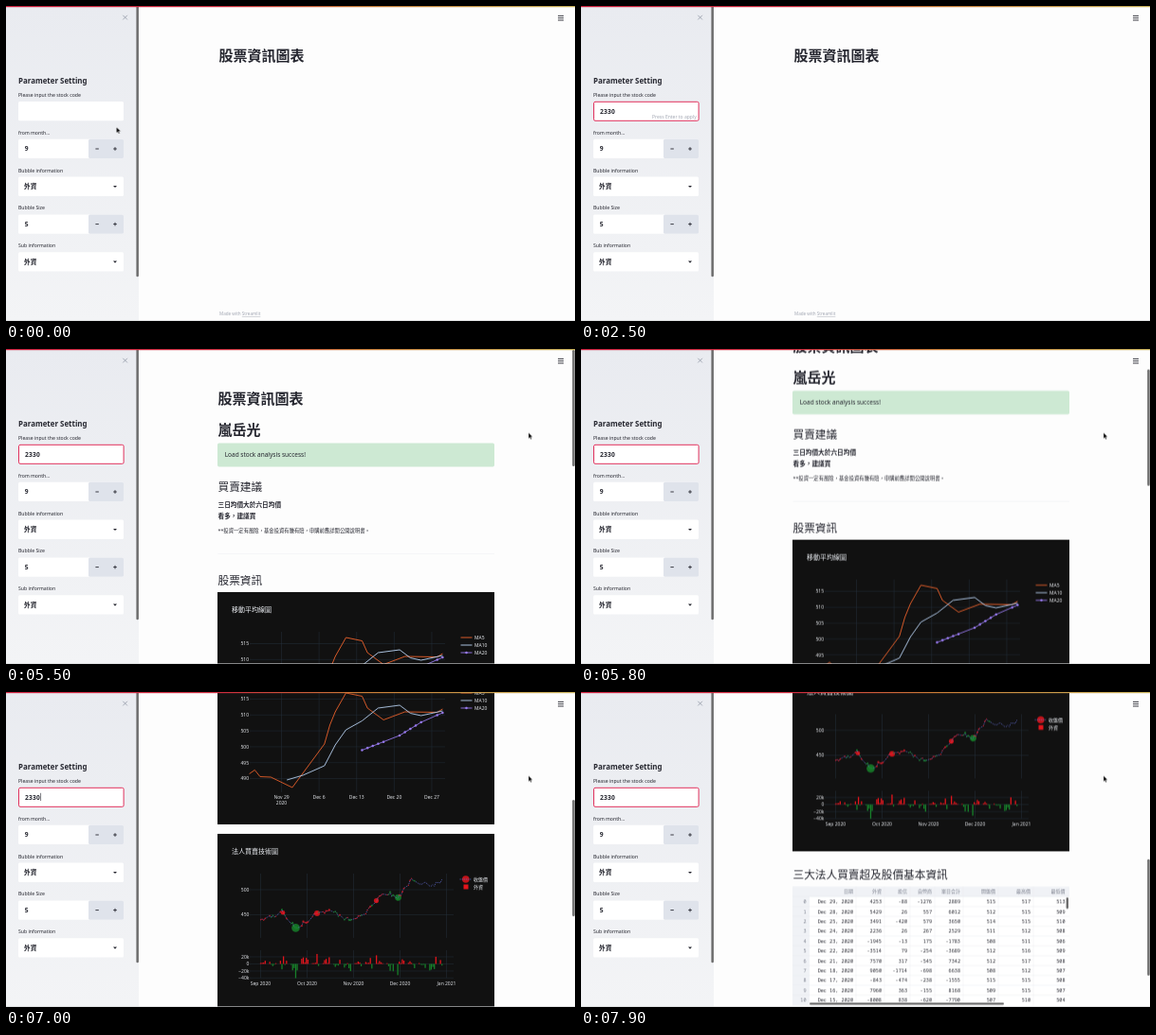
Recreate the animation shown at these times as an HTML page. Size 600 by 333 pixels, loop 8000 ms.

```html
<!DOCTYPE html>
<html>
<head>
<meta charset="utf-8">
<title>Stock dashboard</title>
<style>
html, body { margin: 0; width: 100%; height: 100%; overflow: hidden; background: #fdfdfd; }
svg { display: block; width: 100vw; height: 100vh; }
text { font-family: "Noto Sans", "Noto Sans CJK TC", "Noto Sans CJK JP", "Noto Sans CJK", sans-serif; font-weight: 500; fill: #262730; white-space: pre; }
.bold { font-weight: 700; }
.semi { font-weight: 600; }
.mid { text-anchor: middle; }
.end { text-anchor: end; }
.soft { fill: #a3a8b4; font-weight: 400; }
.plot text { font-family: "Open Sans", "Noto Sans CJK TC", "Noto Sans CJK JP", "Noto Sans CJK", sans-serif; fill: #f2f5fa; }
.grid { stroke: #283442; stroke-width: .45; fill: none; }
.table text { font-family: "Noto Sans Mono", "Noto Sans CJK TC", "Noto Sans CJK JP", "Noto Sans CJK", monospace; }
.table .dim { fill: #7c808e; }
</style>
</head>
<body>
<svg id="stage" viewBox="0 0 600 333" preserveAspectRatio="none"></svg>
<script>
const LOOP = 8000;
const RED = '#e3151c', GREEN = '#17802a', INK = '#262730', BAR = '#6d6d6d';
let css = '';

// Markup helpers
const text = (x, y, size, str, cls = '') => `<text x="${x}" y="${y}" font-size="${size}" class="${cls}">${str}</text>`;
const rect = (x, y, w, h, fill, more = '') => `<rect x="${x}" y="${y}" width="${w}" height="${h}" fill="${fill}" ${more}/>`;
const path = (d, stroke, width, more = '') => `<path d="${d}" fill="none" stroke="${stroke}" stroke-width="${width}" ${more}/>`;
const dot = (x, y, r, fill, more = '') => `<circle cx="${x}" cy="${y}" r="${r}" fill="${fill}" ${more}/>`;
const group = (id, body) => `<g id="${id}">${body}</g>`;
const poly = pts => 'M' + pts.map(p => p.map(v => v.toFixed(1)).join(' ')).join('L');
const hline = (x1, x2, y) => `M${x1} ${y}H${x2}`;
const vline = (x, y1, y2) => `M${x} ${y1}V${y2}`;
const each = (list, fn) => list.map(fn).join('');
const span = (n, fn) => Array.from({ length: n }, (_, i) => fn(i));

// Value at x on the line through a few key points
function along(keys, x) {
  const i = Math.max(1, keys.findIndex(k => k[0] >= x));
  const [a, b] = [keys[i - 1], keys[i]];
  return a[1] + (b[1] - a[1]) * (x - a[0]) / (b[0] - a[0]);
}

let seed = 11;
const rand = () => (seed = seed * 16807 % 2147483647) / 2147483647;

// Keyframe helpers: times in ms, motion advances every 100 ms
const HOLD = true;
const used = {};
function track(id, prop, frames) {
  const all = frames[0][0] ? [[0, frames[0][1], HOLD], ...frames] : frames;
  const rules = all.map(([ms, value, hold], i) => {
    const next = all[i + 1];
    const ease = hold || !next ? 'step-end' : `steps(${(next[0] - ms) / 100})`;
    return `${ms / LOOP * 100}%{${prop}:${value};animation-timing-function:${ease}}`;
  });
  rules.push(`100%{${prop}:${all[all.length - 1][1]}}`);
  css += `@keyframes ${id}-${prop}{${rules.join('')}}`;
  (used[id] = used[id] || []).push(`${id}-${prop} ${LOOP}ms infinite`);
}
const move = (id, frames) =>
  track(id, 'transform', frames.map(([ms, x, y, hold]) => [ms, `translate(${x}px,${y}px)`, hold]));
// Toggles at each listed time, starting hidden
function show(id, ...times) {
  const frames = times.map((ms, i) => [ms, i % 2 ? 0 : 1, HOLD]);
  track(id, 'opacity', times[0] ? [[0, 0, HOLD], ...frames] : frames);
}

const panel = (y, title, body) =>
  `<g class="plot" transform="translate(0 ${y})">${rect(223, 0, 292, 187, '#111')}${text(238, 20.7, 7, title)}${body}</g>`;

function averages() {
  const x = day => 256.6 + 5.66 * (day + 2 * Math.floor(day / 5));
  const place = keys => keys.map(([day, y]) => [x(day), y]);
  const ma5 = place([[0, 133.5], [1, 129.5], [2, 136.5], [4, 137], [6, 148], [10, 102], [11, 82], [12, 68],
    [14, 48], [15, 51.5], [16, 64], [19, 76.5], [21, 68], [25, 68.5], [26, 65]]);
  const ma10 = place([[5, 140], [8, 135], [10, 125], [12, 103], [14, 87], [15, 77.5], [18, 64], [20, 61], [22, 69.5], [24, 72], [26, 67]]);
  const rise = place([[15, 108.5], [20, 93], [24, 79], [26, 69]]);
  const ma20 = span(12, i => [x(15 + i), along(rise, x(15 + i))]);
  const tickY = i => 54.5 + 16.8 * i;
  const weekX = i => 290.5 + 39.62 * i;
  const weeks = ['Nov 29', 'Dec 6', 'Dec 13', 'Dec 20', 'Dec 27'];
  const grid = span(6, i => hline(257, 463, tickY(i))).join('') + span(5, i => vline(weekX(i), 42, 153)).join('');
  const axes = `<path class="grid" d="${grid}"/>`
    + span(6, i => text(256, tickY(i) + 1.8, 5, 515 - 5 * i, 'end')).join('')
    + each(weeks, (w, i) => text(weekX(i), 160, 5, w, 'mid')) + text(weekX(0), 166.3, 5, 2020, 'mid');
  const lines = [['MA5', '#ee642d', ma5], ['MA10', '#bcd5f5', ma10], ['MA20', '#9a7cf2', ma20]];
  const traces = each(lines, ([name, color, pts], i) => path(poly(pts), color, .9)
    + path(hline(479.5, 491.5, 48 + 8 * i), color, .9) + text(494, 49.8 + 8 * i, 5, name))
    + each([...ma20, [485.5, 64]], p => dot(...p, 1.25, lines[2][1]));
  return panel(257, '移動平均線圖', group('axes', axes) + group('traces', traces));
}

function trades() {
  const keys = [[268, 93], [280, 87], [285, 88], [291, 82], [306, 100], [316, 93], [328, 84], [342, 80], [354, 88],
    [364, 92], [380, 83], [396, 64], [404, 63], [413, 68], [428, 48], [436, 52], [452, 54], [462, 49]];
  // Larger trades: place, size and side
  const big = [[292, 2.3, RED], [305.5, 4.3, GREEN], [328, 3, RED], [390.5, 2.6, RED], [413.5, 3.4, GREEN]];
  const line = [];
  let marks = '', bars = '';
  for (let day = 0; day < 120; day++) {
    if ((day + 2) % 7 > 5 || (day + 2) % 7 < 1) continue;
    const x = 268.5 + 1.607 * day;
    const y = along(keys, x) + (rand() - .5) * 4;
    const trade = big.find(b => Math.abs(b[0] - x) < .9);
    const up = along(keys, x + 1) < along(keys, x) !== rand() < .2;
    const fill = trade ? trade[2] : up ? RED : GREEN;
    const h = trade ? trade[1] * 3.5 : .8 + 7 * rand() ** 3;
    line.push([x, y]);
    if (x < 432) marks += dot(x, y, .6 + h * .08, fill, 'opacity=".75"');
    bars += rect(x - .65, fill === RED ? 137.5 - h : 137.5, 1.3, h, fill);
  }
  const bubbles = each(big, ([x, r, fill]) => dot(x, along(keys, x), r, fill, 'opacity=".85"'));
  const months = ['Sep 2020', 'Oct 2020', 'Nov 2020', 'Dec 2020', 'Jan 2021'];
  const monthX = i => 268.5 + 49 * i;
  const scale = [[500, 59], [450, 85.5], ['20k', 130], [0, 137.5], ['−20k', 145], ['−40k', 152.3]];
  const grid = each(scale, s => hline(257, 472, s[1])) + span(5, i => vline(monthX(i), 42, 110) + vline(monthX(i), 123, 152.3)).join('');
  const dashes = 'stroke-dasharray="1.2 .9"';
  return panel(454, '法人買賣技術圖', `<path class="grid" d="${grid}"/>`
    + each(scale, ([v, y]) => text(256.4, y + 1.8, 5, v, 'end'))
    + each(months, (m, i) => text(monthX(i), 159.6, 5, m, 'mid'))
    + bars + bubbles + path(poly(line), '#6672d8', .7, dashes) + marks
    + dot(484.8, 48, 3.8, RED, 'opacity=".85"') + path(hline(478.5, 491, 48), '#6672d8', .7, dashes)
    + text(493, 49.9, 5, '收盤價') + rect(482.5, 53.5, 5, 5, RED) + text(493, 57.9, 5, '外資'));
}

function table() {
  const right = [287, 317, 344, 370, 400, 437, 474, 510.5];
  const heads = '日期 外資 投信 自營商 單日合計 開盤價 最高價 最低價'.split(' ');
  const days = span(15, i => 29 - i).filter(d => d % 7 !== 5 && d % 7 !== 6);
  const rows = `4253 -88 -1276 515 517 513
    5429 26 557 512 515 509
    3491 -420 579 514 515 510
    2236 26 267 511 512 508
    -1945 -13 175 508 511 506
    -3514 79 -254 512 516 509
    7570 317 -545 512 517 508
    9050 -1714 -698 508 512 507
    -843 -474 -238 515 515 508
    7960 363 -155 509 515 507
    -8008 838 -620 507 510 504`.split('\n').map(r => r.trim().split(' '));
  const body = each(rows, (row, i) => {
    const y = 18 + 10.4 * i;
    const net = row.slice(0, 3);
    const sum = net.reduce((total, v) => total + +v, 0);
    const cells = [`Dec ${days[i]}, 2020`, ...net, sum, ...row.slice(3)];
    return text(237.5, y, 5.2, i, 'end dim') + each(cells, (v, j) => text(right[j], y, 5.2, v, 'end'));
  });
  const lines = each(rows, (_, i) => hline(223, 515, 10.7 + 10.4 * i)) + each(right.slice(0, -1), x => vline(x + 3, 0, 125.5));
  return `<g class="table" transform="translate(0 678.3)">${rect(223, 0, 292, 125.5, '#fff')}`
    + rect(223, 0, 292, 10.7, '#f0f2f6') + rect(223, 0, 18, 125.5, '#f0f2f6') + path(lines, '#e9ebf0', .4)
    + each(heads, (h, j) => text(right[j], 7.2, 5, h, 'end dim')) + body
    + rect(511.6, 11.5, 2.4, 12, BAR, 'rx="1.2"') + rect(241, 122.6, 205, 2.4, BAR, 'rx="1.2"') + '</g>';
}

function page() {
  const x = 223.5;
  return text(x, 57.6, 15, '股票資訊圖表', 'bold')
    + group('company', text(x, 90.8, 15, '嵐岳光', 'bold'))
    + group('alert', rect(223, 99.5, 292, 25, '#cde9d3', 'rx="1.7"') + text(230.7, 114.4, 6.5, 'Load stock analysis success!'))
    + group('advice', text(x, 150.4, 11.67, '買賣建議') + text(x, 167.4, 6.67, '三日均價大於六日均價', 'bold'))
    + group('report', text(x, 179, 6.67, '看多，建議買', 'bold')
      + text(x, 193.9, 5.33, '**投資一定有風險，基金投資有賺有賠，申購前應詳閱公開說明書。')
      + path(hline(x, 515, 216.5), '#eceef2', .5)
      + text(x, 249.3, 11.67, '股票資訊') + averages() + trades()
      + text(x, 670.4, 11.67, '三大法人買賣超及股價基本資訊') + table())
    + group('footer', text(x + .5, 327.2, 4.6, 'Made with <tspan text-decoration="underline">Streamlit</tspan>', 'soft'));
}

function sidebar() {
  const rowY = i => 101 + 39.8 * i;
  const box = y => rect(13, y, 111, 20.3, '#fff', 'rx="1.5"');
  const number = (y, v) => box(y) + rect(87, y, 37, 20.3, '#dfe3eb', 'rx="1.5"') + text(19.8, y + 12.6, 6.67, v, 'semi')
    + path(`${hline(94.4, 97.8, y + 10.2)}${hline(113.2, 116.8, y + 10.2)}${vline(115, y + 8.4, y + 12)}`, INK, .9);
  const select = y => box(y) + text(19, y + 12.6, 6.67, '外資', 'semi')
    + `<path d="M113 ${y + 9.4}h4l-2 2.1z" fill="${INK}"/>`;
  const labels = ['Please input the stock code', 'from month...', 'Bubble information', 'Bubble Size', 'Sub information'];
  return rect(0, 0, 140, 333, 'url(#side)') + path('M123.3 9.8l4.6 4.6m0-4.6l-4.6 4.6', '#a3a8b4', 1)
    + text(13, 82, 7.9, 'Parameter Setting', 'bold')
    + each(labels, (l, i) => text(13, rowY(i) - 5, 5.15, l))
    + box(rowY(0)) + number(rowY(1), 9) + select(rowY(2)) + number(rowY(3), 5) + select(rowY(4))
    + group('focus', rect(13.5, 101.3, 110.6, 20, 'none', 'rx="1.5" stroke="#e0305c" stroke-width="1"'))
    + each([...'2330'], (c, i) => group('key' + i, text(19.9 + 4.02 * i, 113.6, 6.67, c, 'semi')))
    + group('hint', text(121.7, 118.9, 5, 'Press Enter to apply', 'soft end'))
    + group('caret', group('caretPos', rect(0, 106.8, .6, 8.2, INK)))
    + rect(137.4, -2, 2.5, 288.3, BAR, 'rx="1.25"');
}

const status = group('status',
  path('M502 14.8q1.1-1 2.2 0t2.2 0 2.2 0 2.2 0M502 16.4h8.6M503 9.4l2.6 1.2 2.3 2.6M505.6 10.6l3.4-1.6', '#8b8f9b', .7)
  + dot(508.9, 11.7, .9, '#8b8f9b')
  + text(515, 14.4, 4.8, 'RUNNING...', 'soft')
  + rect(546.8, 6.6, 26.4, 11.3, '#fff', 'rx="1.7" stroke="#dfe2e8" stroke-width=".5"') + text(560, 14.1, 5.2, 'Stop', 'mid semi'));

const stops = (...list) => each(list, ([at, color]) => `<stop offset="${at}" stop-color="${color}"/>`);
document.getElementById('stage').innerHTML = `<defs>
  <linearGradient id="side" x2="0" y2="1">${stops([0, '#e9ebf0'], [1, '#f3f4f6'])}</linearGradient>
  <linearGradient id="bar">${stops([0, '#cc1f3d'], [.38, '#cd2c3d'], [.62, '#c67a35'], [1, '#c9b25a'])}</linearGradient>
</defs>`
  + rect(0, 0, 600, 333, '#fdfdfd') + group('page', page()) + sidebar() + status
  + path('M582 10.4h6M582 12.7h6M582 15h6', INK, .9)
  + group('thumb', group('thumbPos', rect(597.2, 1, 2.5, 123, BAR, 'rx="1.25"')))
  + rect(0, 0, 600, 1.2, 'url(#bar)') + rect(0, 332.4, 600, .6, '#d4d5d8')
  + group('beam', group('beamPos', path('M-1.4-3.4q1.4 0 1.4 1v4.8q0 1-1.4 1M1.4-3.4q-1.4 0-1.4 1v4.8q0 1 1.4 1', '#222', .6)))
  + group('arrow', group('arrowPos', '<path d="M0 0v6.2l1.4-1.3 1 2.2 1-.4-1-2.2h2z" fill="#000" stroke="#fff" stroke-width=".35"/>'));

// Typing
track('focus', 'opacity', [[0, 0, HOLD], [500, 0], [800, 1, HOLD]]);
const typed = [1300, 1600, 1800, 2000];
typed.forEach((ms, i) => show('key' + i, ms));
move('caretPos', [[0, 19.8, 0, HOLD], ...typed.map((ms, i) => [ms, 24 + 4.02 * i, 0, HOLD])]);
show('caret', 600, 1100, 1300, ...span(11, i => 2500 + 500 * i));
show('hint', 1300, 2900);

// Loading
track('status', 'opacity', [[0, 0, HOLD], [2800, 0], [3200, 1, HOLD], [4200, 0, HOLD]]);
show('company', 3400);
show('alert', 3600);
show('advice', 3800);
show('report', 4200);
show('axes', 4500);
show('traces', 5000);
show('footer', 0, 4200);
show('thumb', 4200);

// Scrolling: the thumb follows the page
const scroll = [[5500, 0], [6300, 147.8], [7500, 415.7], [7900, 472.6]];
move('page', [[0, 1, 0, HOLD], [4200, 0, 0, HOLD], ...scroll.map(([ms, y]) => [ms, 0, -y])]);
move('thumbPos', scroll.map(([ms, y]) => [ms, 0, y * .372]));

// Pointer
show('arrow', 0, 300, 3400);
move('arrowPos', [[0, 116.5, 128], [400, 105, 108, HOLD], [3300, 105, 108], [3900, 408, 67.5], [4500, 551, 88.5, HOLD]]);
show('beam', 300, 1300);
move('beamPos', [[300, 107, 115], [400, 105.5, 110.6, HOLD]]);

for (const id in used) css += `#${id}{animation:${used[id].join(',')}}`;
document.head.appendChild(document.createElement('style')).textContent = css;
</script>
</body>
</html>
```
